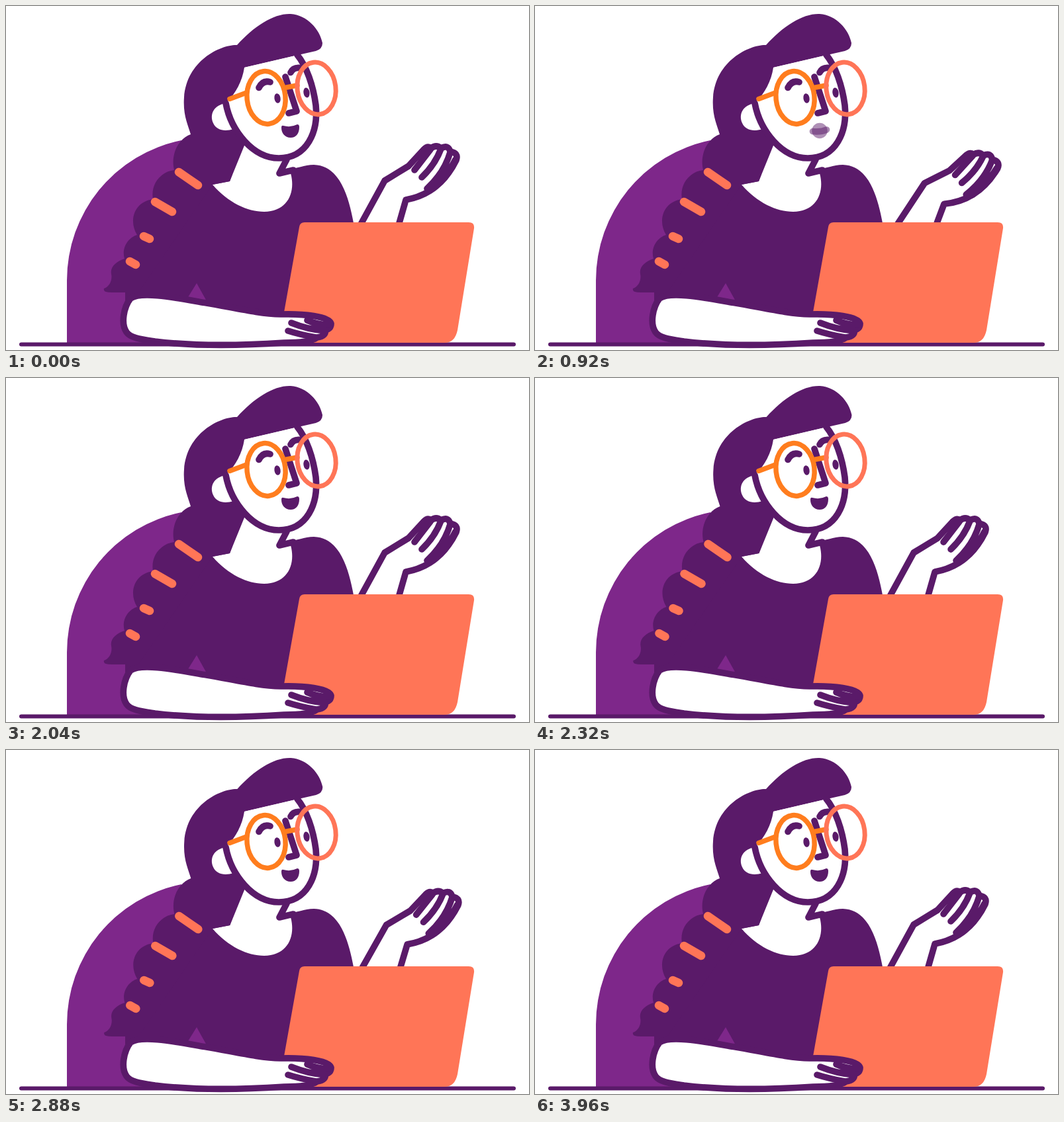
Animation, 790 px wide and 520 px high, one loop 4000 ms. Source, as an HTML page:

```html
<!DOCTYPE html>
<html lang="en">
<head>
<meta charset="utf-8">
<title>Woman at a laptop</title>
<style>
  html, body { margin: 0; width: 100%; height: 100%; overflow: hidden; background: #fff; }
  svg { display: block; width: 790px; height: 520px; }
  .dark { fill: #5a1a69; }
  .mid { fill: #7e278a; }
  .coral { fill: #ff7557; }
  .white { fill: #fff; }
  .line { fill: none; stroke: #5a1a69; stroke-width: 9.7; stroke-linecap: round; stroke-linejoin: round; }
  .skin { fill: #fff; }
  .desk { stroke-width: 6; }
  .ties { stroke: #ff7557; stroke-width: 12.5; }
  .frame { stroke: #ff7d1e; stroke-width: 7.5; }
  .rim { stroke: #ff7557; stroke-width: 7; }
</style>
</head>
<body>
<svg viewBox="0 0 790 520">
  <path class="mid" d="M92 509V415A216 216 0 0 1 265 203L330 509Z"/>
  <path class="line desk" d="M23 511.5H767"/>

  <g id="arm">
    <path class="line skin" d="M516 366L537 328L572 264L608 242L631 217Q637 211 642 215Q650 209 657 215Q668 209 671 220Q684 222 680 233Q655 284 604 293L594 328L583 366"/>
    <path class="line" d="M617 248L641 217M628 259Q648 240 657 216M636 276Q662 252 671 221M645 276Q668 254 679 232"/>
  </g>

  <path class="dark" d="M250 260L338 255L425 247C440 246 450 240 465 240C503 241 517 285 525 328V400L420 470H180V433Z"/>
  <path class="mid" d="M288 419L275 440L303 446Z"/>
  <path class="white" d="M312 270L338 265L360 205L425 228L414 250L430 253C438 282 425 311 390 311C365 311 335 297 312 270Z"/>
  <path class="line" d="M424 232L413 253L434 248"/>

  <g id="hair" class="dark">
    <path d="M349 59C375 30 405 11 430 12C455 14 474 35 478 56Q478 65 468 68L437 75L360 93L370 190L360 211L338 265L312 270L200 433H160Q146 433 148 427C156 424 161 415 159 405C157 394 167 386 179 382C174 365 185 350 198 346C185 325 193 296 222 292C218 268 235 250 254 248C248 222 262 200 279 194C275 180 267 165 269 138C273 82 325 58 349 59Z"/>
    <path class="line ties" d="M261 251L290 271M225 296L251 311M208 348L217 352M187 386L196 391"/>
  </g>

  <path class="white" d="M333 147C314 149 307 164 313 177C318 188 330 190 344 186Z"/>
  <path class="white" d="M360 93L437 75C452 90 464 120 468 150C471 188 460 218 432 227C380 238 340 185 333 145C347 133 357 113 360 93Z"/>
  <path class="line" d="M332 147C340 189 373 230 412 230C455 230 472 190 468 150C464 120 454 91 440 74"/>

  <path class="line" d="M382 123.5Q388 111.500 399 115"/>
  <path class="line" id="brow" d="M430 100.500Q434 92 445 93.500"/>
  <ellipse class="dark" cx="410" cy="139.5" rx="4.6" ry="7.4" transform="rotate(-9 410 139.5)"/>
  <ellipse class="dark" cx="454" cy="131" rx="4.6" ry="7.6" transform="rotate(-9 454 131)"/>
  <path class="line" d="M422 107L439 159L427 162"/>

  <path class="dark" id="smile" d="M419 181Q430 184 440 179Q443 179 443 183C443 193 438 199 430 199C421 199 416 192 416 184Q416 180 419 181Z"/>
  <circle class="dark" id="round" cx="430" cy="188.5" r="11.8"/>
  <path class="line" id="flat" d="M419.5 189.5Q431 191 440.5 187"/>

  <path class="line frame" d="M338 140.5L362 131.5M424 123L440 120"/>
  <ellipse class="line frame" cx="393" cy="138.5" rx="29" ry="40" transform="rotate(-6 393 138.5)"/>
  <ellipse class="line rim" cx="469" cy="124.5" rx="29" ry="39.5" transform="rotate(-7 469 124.5)"/>

  <path class="coral" d="M418 474L443 334Q444 327 451 327H699Q708 327 707 336L682 490Q678 509 663 509H440Z"/>

  <path class="line skin" d="M188 442C178 455 173 480 182 493C188 502 205 504 225 507C290 515 360 513 420 509Q460 509 470 501Q484 499 482 490Q491 488 491 480C488 469 450 465 415 466C380 465 345 456 300 448.5C262 442 205 430 188 442Z"/>
  <path class="line" d="M431 479Q456 489 482 491M426 491Q445 497 468 501M455 475Q470 482 488 482"/>
</svg>
<script>
const LOOP = 4000;
const [arm, brow, hair, smile, round, flat] =
  ["arm", "brow", "hair", "smile", "round", "flat"].map(id => document.getElementById(id));

const ramp = (t, start, length) => Math.min(1, Math.max(0, (t - start) / length));
const ease = x => (1 - Math.cos(Math.PI * x)) / 2;

// Rises from 0 to 1, then falls back, easing both ways.
const swing = (t, start, rise, fall, hold = 0) =>
  ease(ramp(t, start, rise)) - ease(ramp(t, start + rise + hold, fall));

// Opacity of a mouth shape that fades in at one time and out at another.
const shown = (t, from, to) => ramp(t, from, 80) - ramp(t, to, 80);

function draw(now) {
  const t = now % LOOP;

  const reach = swing(t, 0, 850, 850) + 0.18 * swing(t, 2240, 900, 580);
  arm.setAttribute("transform", `translate(${9.5 * reach} 0) rotate(${4.8 * reach} 530 352)`);

  const lift = swing(t, 160, 280, 220, 200) + swing(t, 1480, 120, 120) + swing(t, 2960, 440, 260, 300);
  brow.setAttribute("transform", `translate(${-7 * lift} ${-14 * lift})`);

  hair.setAttribute("transform", `translate(${0.8 * swing(t, 2000, 560, 560)} 0)`);

  smile.setAttribute("opacity", 1 - shown(t, 240, 1640));
  round.setAttribute("opacity", shown(t, 560, 880));
  flat.setAttribute("opacity", shown(t, 240, 560) + shown(t, 880, 1640));

  requestAnimationFrame(draw);
}
draw(performance.now());
</script>
</body>
</html>
```
